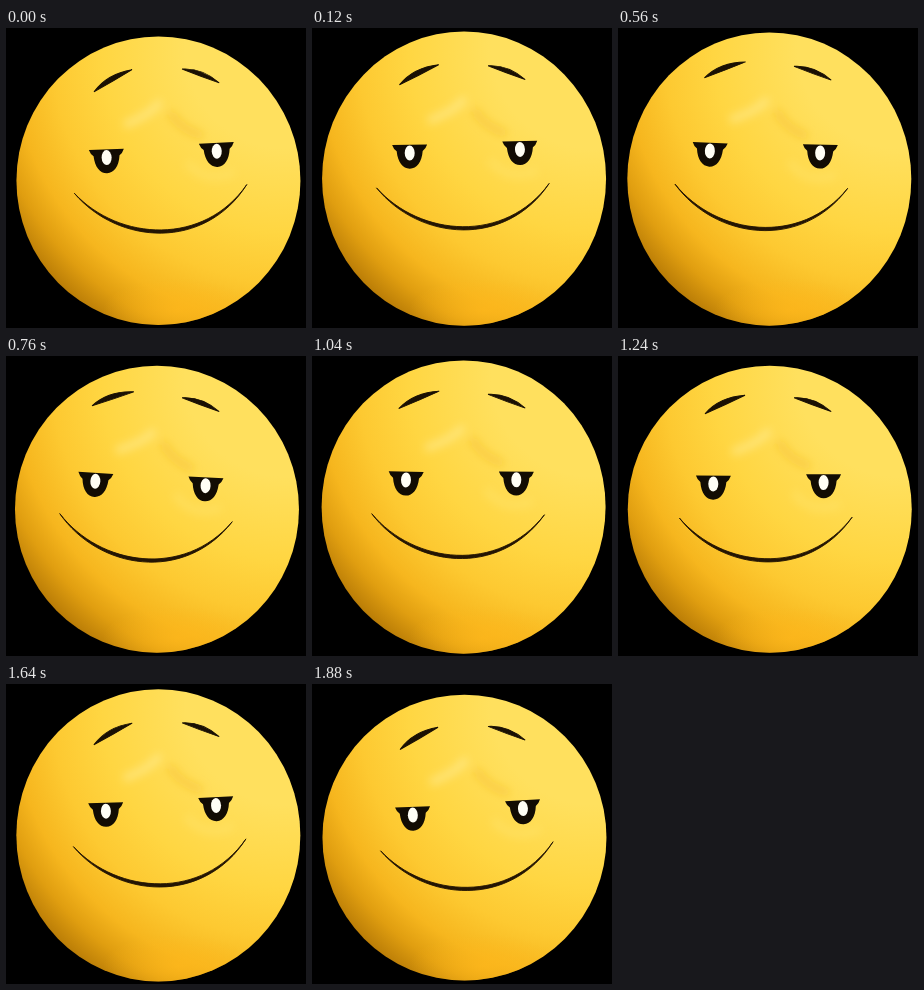
These frames come from a looping animation (300 px wide and 300 px high, 1.92 s). An HTML page:

```html
<!DOCTYPE html>
<html lang="en">
<head>
<meta charset="utf-8">
<title>Smug smiley</title>
<style>
html, body { margin: 0; width: 100%; height: 100%; overflow: hidden; background: #000; }
svg { display: block; width: 100%; height: 100%; }
</style>
</head>
<body>
<svg viewBox="0 0 300 300">
  <defs>
    <radialGradient id="skin" gradientUnits="userSpaceOnUse" cx="280" cy="20" r="335">
      <stop offset=".3" stop-color="#ffe05e"/>
      <stop offset=".55" stop-color="#ffd642"/>
      <stop offset=".7" stop-color="#fdc931"/>
      <stop offset=".82" stop-color="#f6b61e"/>
      <stop offset=".9" stop-color="#e09e10"/>
      <stop offset="1" stop-color="#b07404"/>
    </radialGradient>
    <radialGradient id="glow">
      <stop offset="0" stop-color="#ffb81c" stop-opacity=".75"/>
      <stop offset="1" stop-color="#ffb81c" stop-opacity="0"/>
    </radialGradient>
    <filter id="blur" x="-50%" y="-50%" width="200%" height="200%"><feGaussianBlur stdDeviation="4"/></filter>
    <filter id="soft"><feGaussianBlur stdDeviation=".75"/></filter>
    <clipPath id="clip"><ellipse class="ball" rx="142"/></clipPath>
    <g id="eye">
      <path d="M-17.5-1.500H17.500Q16 3 13 5C12 16 7 22.500 0 22.500S-12 16-13 5Q-16 3-17.500-1.500Z" fill="#120c03"/>
      <ellipse cy="6.800" rx="5" ry="7.500" fill="#fffef4"/>
    </g>
    <path id="brow" d="M-22 1.500Q-2-8.500 22-.5Q0 1-22 1.500Z" fill="#1a1003" stroke="#1a1003"/>
  </defs>
  <g filter="url(#soft)">
    <ellipse class="ball" rx="142" fill="url(#skin)"/>
    <ellipse cx="172" cy="282" rx="75" ry="32" fill="url(#glow)" clip-path="url(#clip)"/>
    <g id="face">
      <g fill="none" stroke-width="8" stroke-linecap="round" filter="url(#blur)">
        <path d="M122 97Q144 88 153 77" stroke="#fff0a0" opacity=".5"/>
        <path d="M166 88Q176 102 194 108" stroke="#f0b020" opacity=".35"/>
        <path d="M184 138Q200 156 226 146" stroke="#ffe878" opacity=".35"/>
      </g>
      <use href="#eye" transform="translate(101 124) rotate(-2)"/>
      <use href="#eye" transform="translate(211 117.500) rotate(-3)"/>
      <path d="M69 166.500C114 214.500 199 219 241.500 157.500C200 223.500 113 218.500 69 166.500Z" fill="#241503" stroke="#241503" stroke-width=".9"/>
    </g>
    <use id="left" href="#brow"/>
    <use id="right" href="#brow"/>
  </g>
</svg>
<script>
const LOOP = 1920, STEP = 40;
const $ = id => document.getElementById(id);
const balls = document.querySelectorAll(".ball");

function place(id, x, y, extra) {
  $(id).setAttribute("transform", `translate(${x} ${y}) ${extra}`);
}

function draw(now) {
  const t = Math.floor(now % LOOP / STEP) * STEP;
  // Cosine with a number of cycles per loop and the time of its crest
  const wave = (cycles, crest) => Math.cos(2 * Math.PI * cycles * (t - crest) / LOOP);
  const bob = wave(4, 130);
  const sway = wave(1, 1670) + .25 * wave(4, 10);
  const dx = 6.8 * sway - 7, dy = -1.5 - 2.9 * bob;

  // The ball stretches a little as it rises
  for (const ball of balls) {
    ball.setAttribute("cx", 152.5 + .1 * dx);
    ball.setAttribute("cy", 152.5 - 1.85 * bob);
    ball.setAttribute("ry", 144.5 + 2.65 * bob);
  }
  place("face", dx, dy, `rotate(${2.5 - 2.6 * sway} 155 162.5)`);
  place("left", 106.8, 48.8 + 5 * sway + dy, `rotate(${-22.5 - 5.5 * sway})`);
  place("right", 194.8, 48.6 + dy, "rotate(23) scale(.9)");
}

let start;
function tick(now) {
  start ??= now;
  draw(now - start);
  requestAnimationFrame(tick);
}
draw(0);
requestAnimationFrame(tick);
</script>
</body>
</html>
```
